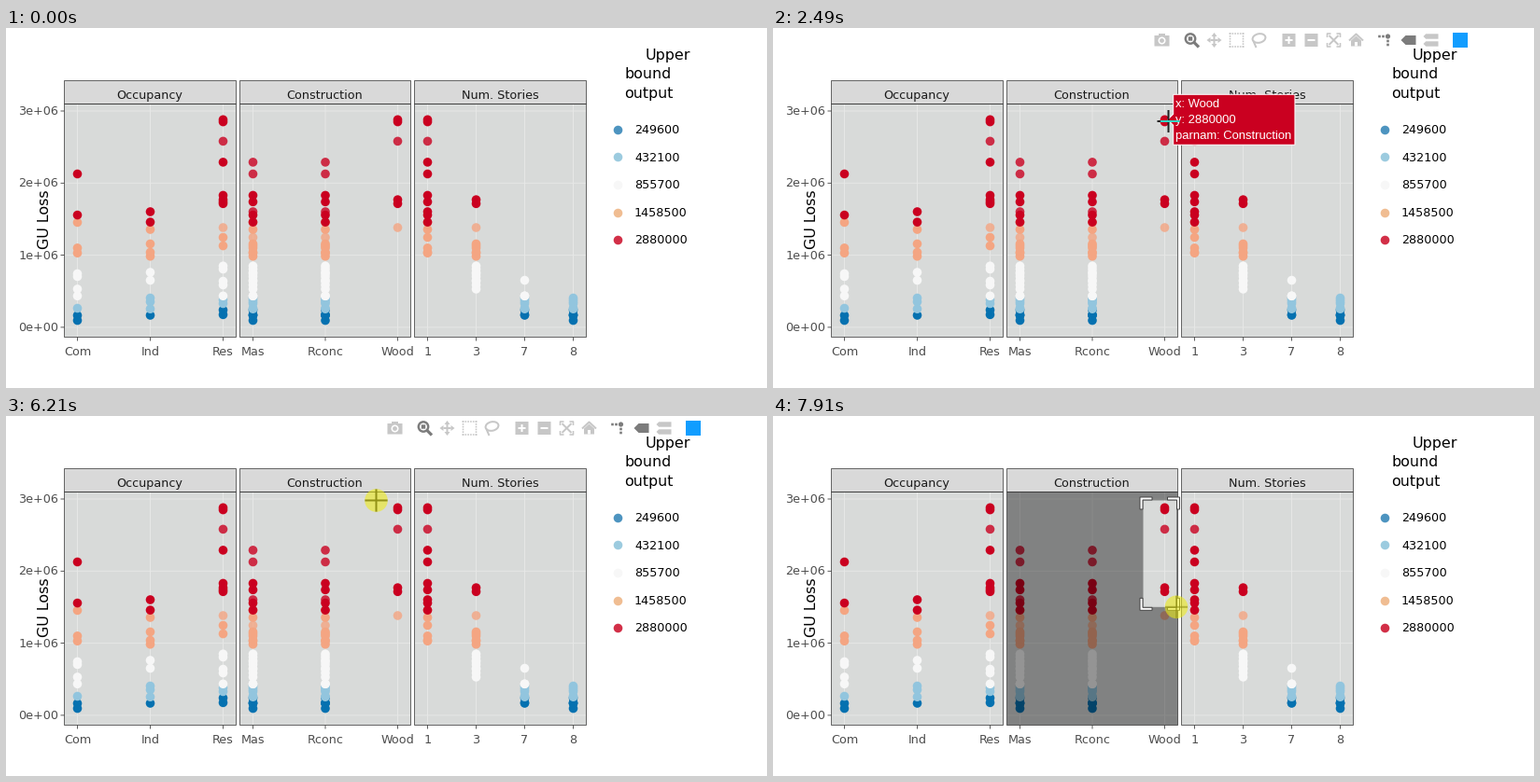
Write a matplotlib script that moves like this. It is 815 by 386 pixels and loops after 8 s.

```python
import numpy as np
import matplotlib as mpl
import matplotlib.pyplot as plt
from matplotlib.animation import FuncAnimation
from matplotlib.colors import to_rgba
from matplotlib.patches import Circle, Ellipse, PathPatch, Polygon, Rectangle
from matplotlib.path import Path

mpl.rcParams.update({"toolbar": "None", "path.snap": False})
W, H, DPI = 815, 386, 100
LOOP, STEP = 8000, 50
PT = 72 / DPI  # points per pixel

# whole-number coordinates are pixel centres
fig = plt.figure(figsize=(W / DPI, H / DPI), dpi=DPI, facecolor="white")
ax = fig.add_axes([0, 0, 1, 1])
ax.set(xlim=(-0.5, W - 0.5), ylim=(H - 0.5, -0.5))
ax.axis("off")


def line(xs, ys, color, width=1.0, z=1):
    return ax.plot(xs, ys, color=color, lw=width * PT, zorder=z,
                   solid_capstyle="butt")[0]


def rect(x0, y0, x1, y1, fill, edge="none", z=1, width=0.72):
    return ax.add_patch(Rectangle((x0, y0), x1 - x0, y1 - y0, facecolor=fill,
                                  edgecolor=edge, lw=width * PT, zorder=z))


def square(x, y, r, color):
    return rect(x - r, y - r, x + r, y + r, color)


def disc(x, y, r, color, ring=0):
    fill, edge = ("none", color) if ring else (color, "none")
    ax.add_patch(Circle((x, y), r, facecolor=fill, edgecolor=edge,
                        lw=ring * PT, zorder=1))


def poly(points, color):
    ax.add_patch(Polygon(points, closed=True, facecolor=color,
                         edgecolor="none", zorder=1))


def text(x, y, s, size=12.75, color="black", ha="left", z=5,
         family="DejaVu Sans", **kw):
    return ax.text(x - 0.5, y - 0.5, s, fontsize=size * PT, color=color, ha=ha,
                   va="baseline", family=family, zorder=z, **kw)


def compound(polygons):
    return Path.make_compound_path(*[Path(list(p) + [p[0]], closed=True)
                                     for p in polygons])


# ---- losses in thousands -------------------------------------------------
BOUNDS = [249.6, 432.1, 855.7, 1458.5, 2880]
COLORS = ["#0571b0", "#92c5de", "#f7f7f7", "#f4a582", "#ca0020"]
LEGEND = ["#4d94c0", "#9ccbdf", "#f7f7f7", "#f0bd92", "#d22f47"]

OCCUPANCY = {
    "Com": [95, 165, 264, 435, 530, 704, 743, 1030, 1100, 1455, 1557, 2127],
    "Ind": [167, 255, 354, 406, 652, 762, 985, 1040, 1157, 1357, 1459, 1603],
    "Res": [175, 240, 329, 380, 435, 587, 639, 807, 850, 1130, 1247, 1383, 1715,
            1740, 1769.6, 1830, 2290, 2580.8, 2850, 2880],
}
LOSSES = sorted(sum(OCCUPANCY.values(), []))
LOW_WOOD = {1383, 1715, 1769.6}
SINGLE = {1383, 2580.8}            # one record
PAIRED = {1247, 1603, 2127, 2290}  # one record in each of two buildings


def pick(rule):
    return [v for v in LOSSES if rule(v)]


heavy = pick(lambda v: v <= 2290 and v not in LOW_WOOD)
CONSTRUCTION = {
    "Mas": heavy,
    "Rconc": heavy,
    "Wood": pick(lambda v: v > 2290 or v in LOW_WOOD),
}
# taller buildings lose less
STORIES = {
    "1": pick(lambda v: v not in LOW_WOOD and (v > 1200 or 1030 <= v <= 1100)),
    "3": pick(lambda v: v in LOW_WOOD or 530 <= v < 1200),
    "7": pick(lambda v: 165 < v <= 435 or v == 652),
    "8": pick(lambda v: v <= 406),
}
PANELS = [("Occupancy", 62, 246, OCCUPANCY),
          ("Construction", 250, 433, CONSTRUCTION),
          ("Num. Stories", 437, 621, STORIES)]

# ---- chart ---------------------------------------------------------------
TOP, BOTTOM, STRIP = 81, 331, 56
GRID, INK = "#e6e7e6", "#333333"
DOT = (9.6 * PT) ** 2


def to_y(value):
    return 320.4 - 0.0773 * value


where = {}  # category -> (x, panel name)
dots = []
for name, x0, x1, columns in PANELS:
    rect(x0, TOP, x1, BOTTOM, "#d8dad9")
    for value in range(0, 3001, 1000):
        line([x0, x1], [to_y(value)] * 2, GRID)
    for x, (label, values) in zip(np.linspace(x0 + 14, x1 - 14, len(columns)),
                                  columns.items()):
        where[label] = x, name
        line([x, x], [TOP, BOTTOM], GRID)
        line([x, x], [BOTTOM, BOTTOM + 4], INK, 0.8)
        text(x + 0.5, 351, label, color="#4d4d4d", ha="center")
        faint = SINGLE | PAIRED if columns is CONSTRUCTION else SINGLE
        dots += [(v, x, 0.8 if v in faint else 1) for v in values]
    rect(x0, STRIP, x1, TOP, "#d9d9d9", INK, 4)
    rect(x0, TOP, x1, BOTTOM, "none", INK, 4)
    text((x0 + x1) / 2, 76, name, color="#1a1a1a", ha="center")

for k in range(4):
    y = to_y(1000 * k)
    line([58, 62], [y, y], INK, 0.8)
    text(56, y + 4.7, f"{k}e+0{6 if k else 0}", color="#4d4d4d", ha="right")

dots.sort()
ax.scatter([x for _, x, _ in dots], [to_y(v) for v, _, _ in dots], s=DOT, lw=0,
           c=[to_rgba(COLORS[np.searchsorted(BOUNDS, v)], a)
              for v, _, a in dots], zorder=2)

text(46, 237, "GU Loss", 15.94, rotation=90, rotation_mode="anchor")
for word, x, y in [("Upper", 685, 34), ("bound", 662, 54), ("output", 662, 75)]:
    text(x, y, word, 15.94)
for k, (bound, color) in enumerate(zip(BOUNDS, LEGEND)):
    y = 108.2 + 29.6 * k
    ax.scatter([654], [y], s=DOT, lw=0, c=color, zorder=2)
    text(673, y + 4.8, f"{bound * 1000:.0f}")

# ---- toolbar -------------------------------------------------------------
PALE, DARK, MID = "#c7c7c7", "#7c7c7c", 12.5
SIDES = [(1, 0), (-1, 0), (0, 1), (0, -1)]
DIAGONALS = [(a, b) for a in (-1, 1) for b in (-1, 1)]


def draw_camera(x):
    rect(x - 8, 7.5, x + 8, 19, PALE)
    rect(x - 3.5, 5.5, x + 3.5, 8, PALE)
    disc(x, 13, 4, "white")
    disc(x, 13, 2.4, PALE)


def draw_lens(x):
    disc(x - 1.5, MID - 1.5, 5.2, DARK, 2.4)
    line([x + 2, x + 7.5], [MID + 2, MID + 7.5], DARK, 3.2)
    square(x - 1.5, MID - 1.5, 2.2, DARK)


def draw_pan(x):
    for dx, dy in SIDES:
        tip = np.array([x + 8 * dx, MID + 8 * dy])
        back = tip - 4 * np.array([dx, dy])
        side = 3 * np.array([dy, dx])
        line([x, back[0]], [MID, back[1]], PALE, 2)
        poly([tip, back + side, back - side], PALE)


def draw_dashed_box(x):
    for p in np.linspace(-7, 7, 6):
        for q in (-7, 7):
            square(x + p, MID + q, 0.8, PALE)
            square(x + q, MID + p, 0.8, PALE)


def draw_lasso(x):
    ax.add_patch(Ellipse((x, MID - 2), 14, 9.5, angle=-12, facecolor="none",
                         edgecolor=PALE, lw=2 * PT, zorder=1))
    line([x - 6, x - 3], [MID + 1, MID + 8], PALE, 2)


def draw_sign(x, plus):
    square(x, MID, 7, PALE)
    line([x - 4, x + 4], [MID, MID], "white", 2)
    if plus:
        line([x, x], [MID - 4, MID + 4], "white", 2)


def draw_autoscale(x):
    for sx, sy in DIAGONALS:
        cx, cy = x + 7 * sx, MID + 7 * sy
        line([cx - 4 * sx, cx, cx], [cy, cy, cy - 4 * sy], PALE, 1.6)
        line([x, cx - 2 * sx], [MID, cy - 2 * sy], PALE, 2)


def draw_home(x):
    line([x - 7.5, x, x + 7.5], [13, 6, 13], PALE, 2)
    poly([(x - 5.5, 13), (x, 8), (x + 5.5, 13), (x + 5.5, 19), (x - 5.5, 19)],
         PALE)
    rect(x - 1.5, 14.5, x + 1.5, 19, "white")


def draw_spikes(x):
    disc(x + 4, 8.5, 2.6, DARK)
    for d in (5, 9):
        square(x + 4 - d, 8.5, 1.3, DARK)
        square(x + 4, 8.5 + d, 1.3, DARK)


def draw_tag(x, y, half, color):
    poly([(x - 8, y), (x - 8 + half, y - half), (x + 8, y - half),
          (x + 8, y + half), (x - 8 + half, y + half)], color)


draw_camera(416)
draw_lens(448)
draw_pan(472)
draw_dashed_box(496)
draw_lasso(520)
draw_sign(552, True)
draw_sign(576, False)
draw_autoscale(600)
draw_home(624)
draw_spikes(654)
draw_tag(680, MID, 5, DARK)
draw_tag(704, MID - 4, 2.7, PALE)
draw_tag(704, MID + 4, 2.7, PALE)
square(735.5, MID, 8, "#119dff")
veil = rect(404, 2, 748, 22, "white", z=3)

# ---- pointer and hover labels --------------------------------------------
ENTER, PRESS, DRAG, LAG = 770, 6210, 6390, 28
START, ANCHOR = np.array([575, 329]), np.array([396, 90])

# begin, end, x, y reached
MOVES = [
    (ENTER, 1000, 484, 162), (1045, 1290, 423, 91), (1470, 1780, 423, 96),
    (2400, 2490, 423, 99.5), (2560, 2960, 426, 122.5), (4120, 4330, 421, 100),
    (4330, 4890, 305, 92), (4960, 5060, 359, 86), (5100, 5320, 420, 96),
    (5320, 5660, *ANCHOR), (DRAG, 7910, 431.5, 204.3),
]
# begin, end, category, value
TIPS = [
    (940, 1075, "3", 1769.6), (2490, 2760, "Wood", 2880),
    (2760, 4250, "Wood", 2580.8), (4250, 4460, "Wood", 2880),
    (5250, 5520, "Wood", 2880),
]


def pointer(t):
    pos = START
    for begin, end, x, y in MOVES:
        if t <= begin:
            break
        s = min(1, (t - begin) / (end - begin))
        if begin == DRAG:  # the drag slows down towards its end
            s = 1 - (1 - s) ** 2.8
        pos = pos + s * (np.array([x, y]) - pos)
    return pos


shade = ax.add_patch(PathPatch(Path([(0, 0)]), facecolor="black",
                               edgecolor="none", zorder=3))
corners = ax.add_patch(PathPatch(Path([(0, 0)]), facecolor="white",
                                 edgecolor="#444444", lw=PT, zorder=6))
bubble = ax.add_patch(Polygon([(0, 0), (1, 1), (1, 0)], closed=True,
                              facecolor="#ca0020", edgecolor="white",
                              lw=PT, zorder=6))
rows = [text(0, 0, "", 13, "white", z=7, family="Liberation Sans")
        for _ in range(3)]
across, down = (line([], [], "#222222", 2, 8) for _ in range(2))
inverted = line([], [], "#35d8c4", 2, 8)
halo = ax.add_patch(Circle((0, 0), 12.3, facecolor="#f0ee0c", alpha=0.55,
                           edgecolor="none", zorder=9))


def show_tip(t):
    """Place the hover label; return the dot it belongs to."""
    tip = next((p for p in TIPS if p[0] <= t < p[1]), None)
    for artist in (bubble, *rows):
        artist.set_visible(tip is not None)
    if tip is None:
        return None
    _, _, category, value = tip
    x, panel = where[category]
    y, left = to_y(value), x + 9.2
    words = [f"x: {category}", f"y: {value * 1000:.0f}", f"parnam: {panel}"]
    for k, (row, word) in enumerate(zip(rows, words)):
        row.set_text(word)
        row.set_position((left + 2, y - 13 + 16.9 * k))
    right = left + 6 + max(row.get_window_extent().width for row in rows)
    bubble.set_xy([(left - 6, y), (left, y - 6), (left, y - 27),
                   (right, y - 27), (right, y + 27), (left, y + 27),
                   (left, y + 6)])
    return x, y


def corner(x, y, sx, sy, arm):
    pts = [(-3.5, arm - .5), (-.5, arm - .5), (-.5, -.5), (arm - .5, -.5),
           (arm - .5, -3.5), (-3.5, -3.5)]
    return [(x + sx * px, y + sy * py) for px, py in pts]


def box(x0, y0, x1, y1):
    return [(x0, y0), (x1, y0), (x1, y1), (x0, y1)]


def show_zoom(t):
    """Shade the panel outside the dragged zone; return (is_box, bottom)."""
    on = t > DRAG + LAG
    shade.set_visible(on)
    corners.set_visible(on)
    if not on:
        return None
    _, x0, x1, _ = PANELS[1]
    left, top = ANCHOR
    right, bottom = pointer(t - LAG)
    is_box = right - left >= 20
    if is_box:
        arm = min(10, (right - left) // 2)
        marks = [corner(right if sx < 0 else left, bottom if sy < 0 else top,
                        sx, sy, arm) for sx, sy in DIAGONALS]
    else:
        marks = [box(left - 20.5, y, left + 20.5, y + d)
                 for y, d in ((top - .5, -3), (bottom + .5, 3))]
        left, right = x0, x1
    shade.set_path(compound([box(x0, TOP, x1, BOTTOM),
                             box(left, top, right, bottom)[::-1]]))
    shade.set_alpha(0.4 * min(1, (t - DRAG) / 200))
    corners.set_path(compound(marks))
    return is_box, bottom


def update(i):
    t = i * STEP + STEP - 10
    x, y = pointer(t)
    veil.set_alpha(np.interp(t, [ENTER, 980, 6480, 6780], [1, 0, 0, 1]))
    tip = show_tip(t)
    zoom = show_zoom(t)

    for artist in (across, down):
        artist.set_visible(t >= ENTER)
        artist.set_alpha(0.6 if zoom else 1)
    across.set_data([x - 12, x + 12], [y, y])
    down.set_data([x, x], [y - 12, y + 12])
    if zoom and not zoom[0]:
        across.set_visible(False)
        down.set_data([x, x], [max(y - 12, ANCHOR[1]), zoom[1]])

    # the pointer inverts the red below it
    over = tip is not None and abs(x - tip[0]) < 12 and abs(y - tip[1]) < 6
    inverted.set_visible(over)
    if over:
        inverted.set_data([max(x - 12, tip[0] - 4.5), x + 12], [y, y])

    halo.set_visible(t >= PRESS)
    halo.center = (x, y)
    return ()


anim = FuncAnimation(fig, update, frames=LOOP // STEP, interval=STEP,
                     repeat=True, repeat_delay=0, blit=False)
plt.show()
```
